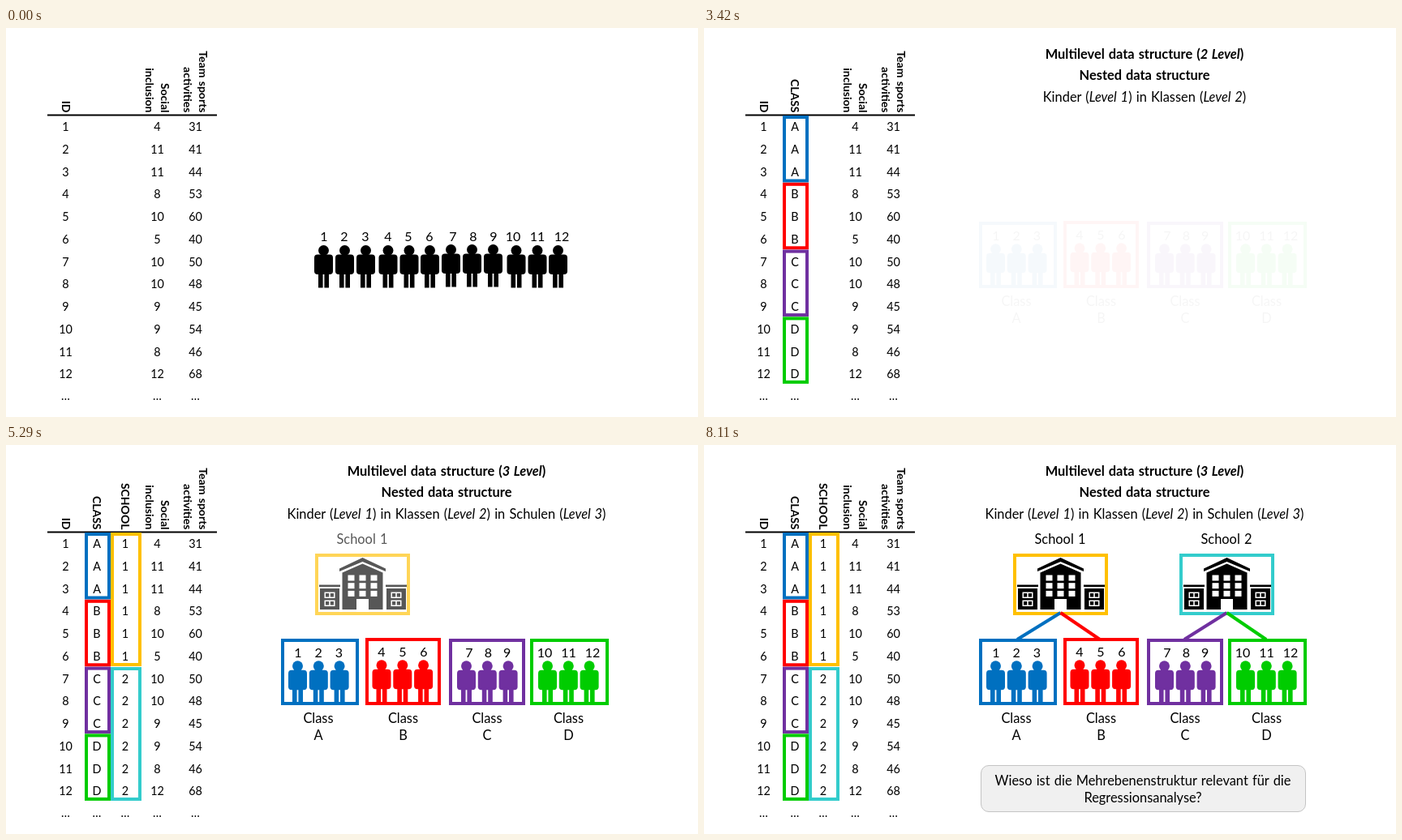
An HTML page that plays this animation: 853x480 px, repeating every 8170 ms.

```html
<!DOCTYPE html>
<html lang="en">
<head>
<meta charset="utf-8">
<style>
  html, body { margin: 0; width: 100%; height: 100%; overflow: hidden; background: #fff; }
  svg { display: block; width: 853px; height: 480px; }
  text { font: 16.4px Lato, sans-serif; text-anchor: middle; word-spacing: 1px; }
  .cell { font-size: 14.4px; }
  .head { font-size: 14px; font-weight: bold; text-anchor: end; }
  .bold { font-weight: bold; }
  .num { font-size: 16px; }
  .i { font-style: italic; }
</style>
</head>
<body>
<svg id="stage" viewBox="0 0 853 480"></svg>
<script>
const LOOP = 8170, FADE = 445;
const BLUE = '#0070c0', RED = '#f00', PURPLE = '#7030a0', GREEN = '#0c0', YELLOW = '#ffc000', TEAL = '#3cc';
const classColors = [BLUE, RED, PURPLE, GREEN];

const text = (x, y, s, cls = '') => `<text x="${x}" y="${y}" class="${cls}">${s}</text>`;
const rect = (x, y, w, h, fill = '#000', r = 0) =>
  `<rect x="${x}" y="${y}" width="${w}" height="${h}" rx="${r}" fill="${fill}"/>`;
// Outer bounds in, 4px border drawn inside them
const frame = (x1, y1, x2, y2, color) =>
  `<rect x="${x1 + 2}" y="${y1 + 2}" width="${x2 - x1 - 4}" height="${y2 - y1 - 4}" fill="none" stroke="${color}" stroke-width="4"/>`;
const line = (x1, y1, x2, y2, color, w) =>
  `<path d="M${x1} ${y1}L${x2} ${y2}" stroke="${color}" stroke-width="${w}"/>`;
const header = (x, s) => `<text class="head" transform="translate(${x} 104.5) rotate(90)">${s}</text>`;
const italic = s => `<tspan class="i">${s}</tspan>`;
const level = n => `(${italic('Level ' + n)})`;
const column = (x, values) =>
  [...values, '…'].map((v, i) => text(x, 127.2 + i * 27.75 - (i > 11 ? 1 : 0), v, 'cell')).join('');
const fade = (start, body, end = Infinity, length = FADE) =>
  `<g data-in="${start}" data-out="${end}" data-length="${length}">${body}</g>`;

const person = (x, y, color) => `<g transform="translate(${x} ${y})">` +
  `<circle cy="0" r="6.5" fill="${color}"/>` + rect(-11.5, 5, 23, 24.5, color, 4) +
  rect(-6.5, 27, 5.6, 19, color) + rect(0.9, 27, 5.6, 19, color) + '</g>';

function crowd() {
  const bodies = [391.5, 417.5, 443.5, 471, 497, 522.5, 548.5, 574.5, 600.5, 629, 655, 680.5];
  const labels = [392, 417, 443, 471, 496, 522, 551, 576, 601, 625, 655, 685];
  return bodies.map((x, i) =>
    person(x, i > 5 && i < 9 ? 273.5 : 274.5, '#000') + text(labels[i], 262.7, i + 1, 'num')).join('');
}

function classroom(k) {
  const [x1, x2, body, label] = [
    [339, 435, 359.5, 360], [443, 536, 463, 463], [546, 640, 567.5, 571], [646, 743, 667.5, 664]][k];
  const up = k === 1 ? 1 : 0, gap = [25.2, 26, 23.3, 29.5][k], mid = [385, 489.5, 593, 693.5][k];
  let out = frame(x1, 239 - up, x2, 321, classColors[k]);
  for (let i = 0; i < 3; i++) {
    out += person(body + i * 25.8, 272.8 - up, classColors[k]) +
      text(label + i * gap, 261.7 - up, k * 3 + i + 1, 'num');
  }
  return out + text(mid, 343, 'Class') + text(mid, 364, 'ABCD'[k]);
}

function wing(x) {
  let out = rect(x - 1, 172.5, 26, 2.6) + rect(x, 177, 24, 26);
  for (const y of [181.5, 191.5])
    out += rect(x + 5.5, y, 13, 7.5, '#fff') + rect(x + 7, y + 1.5, 4.2, 4.5) + rect(x + 12.8, y + 1.5, 4.2, 4.5);
  return out;
}

function school(n, dx, color) {
  let out = text(439, 122, 'School ' + n) + frame(381, 134, 498, 210, color) +
    '<path d="M411 152.5L439.5 139L468 152.5V156L439.5 144L411 156Z"/>' +
    '<path d="M414.5 203V157.5L439.5 146.5L464.5 157.5V203Z"/>' + wing(387) + wing(469);
  for (let i = 0; i < 9; i++)
    out += rect(421.5 + i % 3 * 14, 160.5 + Math.floor(i / 3) * 9.7, 8, 7, '#fff');
  out += rect(432, 190, 15, 13, '#fff');
  return `<g transform="translate(${dx} 0)">${out}</g>`;
}

const title = n => text(543, 38, `Multilevel data structure (${italic(n + ' Level')})`, 'bold');
const subtitle = `Kinder ${level(1)} in Klassen ${level(2)}`;
const classBox = k => frame(97, 108 + k * 82.8, 129, 190.5 + k * 82.8, classColors[k]);
const link = (x1, x2, k) => line(x1, 207, x2, 240, classColors[k], 4);

const question = '<rect x="341.5" y="395.5" width="400" height="57" rx="9.5" fill="#f0f0f0" stroke="#c4c4c4"/>' +
  text(541, 420, 'Wieso ist die Mehrebenenstruktur relevant für die') + text(541, 441, 'Regressionsanalyse?');

const stage = document.getElementById('stage');
stage.innerHTML = [
  header(68.5, 'ID'), header(191, 'Social'), header(172, 'inclusion'),
  header(238, 'Team sports'), header(219, 'activities'),
  line(51, 107.5, 260, 107.5, '#000', 2),
  column(73.5, Array.from({ length: 12 }, (_, i) => i + 1)),
  column(186.5, [4, 11, 11, 8, 10, 5, 10, 10, 9, 9, 8, 12]),
  column(233.5, [31, 41, 44, 53, 60, 40, 50, 48, 45, 54, 46, 68]),
  fade(1060, header(107, 'CLASS') + column(112, 'AAABBBCCCDDD') + text(543, 64, 'Nested data structure', 'bold'), Infinity, 360),
  fade(1060, title(2) + text(543, 91, subtitle), 3850, 360),
  fade(1240, classBox(0), Infinity, 380),
  fade(1625, classBox(1)),
  fade(2070, classBox(2)),
  fade(2515, classBox(3)),
  fade(-FADE, crowd(), 2975),
  fade(3405, [0, 1, 2, 3].map(classroom).join('')),
  fade(3850, header(141.5, 'SCHOOL') + column(147, '111111222222') + title(3) +
    text(543, 91, `${subtitle} in Schulen ${level(3)}`)),
  fade(4295, frame(129, 108, 167, 273, YELLOW)),
  fade(4530, frame(129, 274, 167, 439, TEAL)),
  fade(5000, school(1, 0, YELLOW)),
  fade(5445, school(2, 205, TEAL)),
  fade(5890, link(439.5, 386, 0)),
  fade(6335, link(439.5, 488, 1)),
  fade(6780, link(644.5, 592, 2)),
  fade(7225, link(644.5, 693, 3)),
  fade(7670, question, Infinity, 430),
].join('');

const layers = [...stage.querySelectorAll('[data-in]')].map(el => ({
  el, start: +el.dataset.in, end: +el.dataset.out, length: +el.dataset.length }));
const clamp = v => Math.max(0, Math.min(1, v));

function draw() {
  const t = performance.now() % LOOP;
  for (const { el, start, end, length } of layers)
    el.setAttribute('opacity', clamp((t - start) / length) * (1 - clamp((t - end) / FADE)));
  requestAnimationFrame(draw);
}
draw();
</script>
</body>
</html>
```
